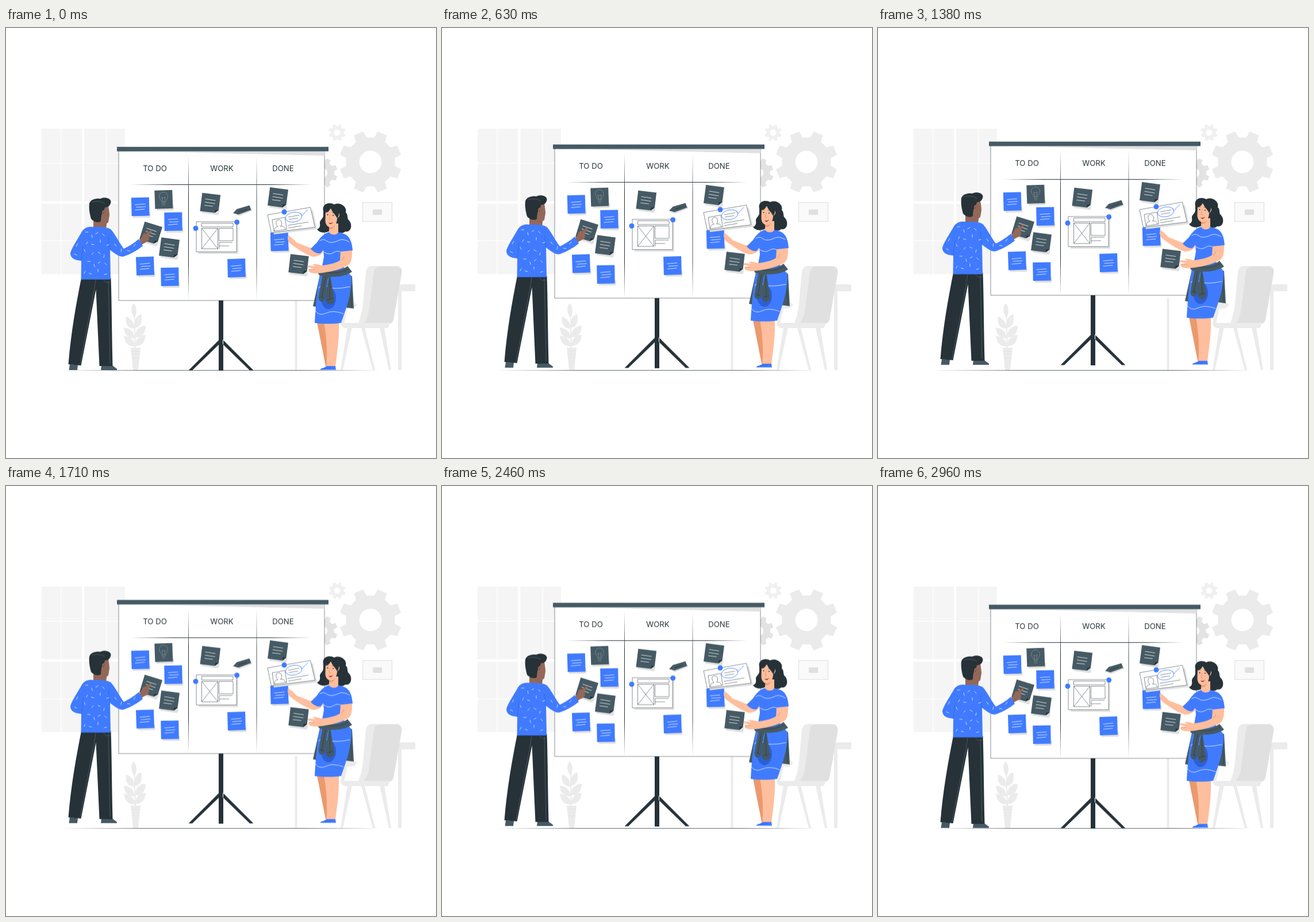
Animation, 748 px wide and 748 px high, one loop 3 s. Source, as an HTML page:

```html
<!DOCTYPE html>
<html lang="en">
<head>
<meta charset="utf-8">
<title>Task board</title>
<style>
  html, body { margin: 0; width: 100%; height: 100%; overflow: hidden; background: #fff; }
  svg { display: block; width: 100vw; height: 100vh; }
  #float { animation: float 3s infinite steps(36); }
  @keyframes float { 50% { transform: translateY(-10px); } }
  text { font: 13.2px Inter, "Open Sans", sans-serif; text-anchor: middle; fill: #263238; }
  .thin { fill: none; stroke: #263238; stroke-width: .55; }
  .sheet { fill: #fff; stroke: #263238; stroke-width: .55; }
  .chalk { fill: none; stroke: #fff; stroke-width: .75; stroke-linecap: round; stroke-linejoin: round; }
  .faint { fill: none; stroke: #6d7d85; stroke-width: .5; }
  .blue { fill: #407bff; }
  .dark { fill: #263238; }
  .slate { fill: #455a64; }
  .skin { fill: #ffbe9d; }
  .shade { fill: #eb996e; }
  .brown { fill: #946858; }
  .g1 { fill: #f5f5f5; }
  .g2 { fill: #ebebeb; }
  .g3 { fill: #e0e0e0; }
</style>
</head>
<body>
<svg viewBox="0 0 748 748">
  <!-- window -->
  <path class="g1" d="M62 175H207V428H62Z"/>
  <path d="M134.200 175V428M62 303.500H207" stroke="#fff" stroke-width="4.500"/>
  <path d="M96 175V428M175.300 175V428M62 235.300H207M62 370.300H207" stroke="#fff" stroke-width="1.200"/>

  <g id="gears"></g>

  <!-- picture frame -->
  <path d="M620.500 303.500H671.500V336.500H620.500Z" fill="#fafafa" stroke="#e6e6e6" stroke-width="1.500"/>
  <path class="g3" d="M638 315.500H654V325H638Z"/>

  <!-- plant -->
  <g class="g2">
    <path d="M217 556H234L230 595H221Z"/>
    <path d="M222 479C228 484 228 496 224 505C217 496 216 485 222 479Z"/>
    <path d="M224 522C221 508 228 500 235 498C238 510 235 520 224 522Z"/>
    <path d="M223 523C210 522 207 512 209 502C218 505 224 513 223 523Z"/>
    <path d="M224 538C225 523 235 517 243 518C243 531 236 539 224 538Z"/>
    <path d="M224 540C211 541 205 531 205 521C216 522 224 530 224 540Z"/>
    <path d="M224 553C226 539 235 533 243 534C242 547 235 554 224 553Z"/>
    <path d="M225 554C212 555 206 546 205 535C216 537 225 544 225 554Z"/>
    <path d="M222.500 495H224L226 557H224Z"/>
  </g>
  <path d="M218 562H233M219 568H232.500M219.500 574H232" stroke="#e0e0e0" stroke-width=".6"/>

  <!-- desk and chair -->
  <path class="g2" d="M502.500 470H506.500V595H502.500ZM680 446H712V458H688V595H682V458H680Z"/>
  <path class="g2" d="M636 414H682Q690 416 688 428L674 507Q672 515 664 515H612Q619 500 621 480L626 424Q628 414 636 414Z"/>
  <path class="g3" d="M648 415H680Q690 416 688 428L674 507Q672 515 664 515H621Q628 508 631 494L640 424Q641 416 648 415Z"/>
  <path class="g2" d="M584 489Q588 476 604 477L611 481Q606 490 594 488L588 514H583Z"/>
  <path class="g2" d="M582 513H668L664 522H590Q583 521 582 513Z"/>
  <path class="g2" d="M594 521H602L586 595H582ZM618 521H624L642 595H638ZM650 521H658L670 595H666Z"/>
  <path class="dark" d="M95 595.500L240 595H520L651 595.500L520 596H240Z" opacity=".7"/>

  <g id="float">
    <!-- tripod -->
    <path class="dark" d="M370 474H378V596H370ZM371 542V550L324 595.500H317.500ZM377 542V550L424 595.500H430.500Z"/>

    <!-- board -->
    <path class="sheet" d="M196 214H554V474H196Z"/>
    <path class="g3" d="M210 214H554V222Z"/>
    <path class="slate" d="M193 206.800H561V214.500H193Z"/>
    <path class="dark" d="M317.500 222L318 290V410L317.500 474L317 410V290ZM436 222L436.400 290V410L436 474L435.600 410V290ZM217 272.500L290 272.100H460L531 272.500L460 272.900H290Z"/>
    <text x="259" y="248.600">TO DO</text>
    <text x="375.500" y="248.600">WORK</text>
    <text x="482" y="248.600">DONE</text>

    <g id="notes"></g>

    <!-- light bulb sketch -->
    <g fill="none" stroke="#93a0a6" stroke-width=".6">
      <path d="M271 303C271 299 266.500 298 266.500 293A7.500 7.500 0 0 1 281.500 293C281.500 298 277.500 299 277.500 303ZM271 305.500H277.500M271.500 308H277"/>
      <path d="M273 303L271 294L274 296L277 294L275.500 303"/>
    </g>

    <!-- tag -->
    <path class="g3" d="M398 325L428 315L428 318L406 327Z"/>
    <path class="slate" d="M395 322L401.500 315L423.500 308.500L426.500 316.500L404.500 324.500Z"/>
    <path d="M405 319.500L419 315" stroke="#263238" stroke-width=".8"/>

    <!-- wireframe sheet -->
    <path class="g3" d="M335 340H404V393H335Z"/>
    <path class="sheet" d="M331 337H401V389.500H331Z"/>
    <path class="thin" d="M340.500 339.500H395V346H340.500ZM340.500 348.500H368.500V384H340.500ZM340.500 348.500L368.500 384M368.500 348.500L340.500 384M370.500 348.500H395V370H370.500ZM394 373H371V384M371 379H388"/>
    <circle class="blue" cx="330" cy="348.500" r="4.500"/>
    <circle class="blue" cx="401.700" cy="337.800" r="4.500"/>

    <!-- profile card -->
    <path class="g3" d="M460 329L534 317L541 350L466 359Z"/>
    <path class="sheet" d="M455 325L529.500 312L537.500 346.500L461.500 356Z"/>
    <path class="thin" d="M463 333.500L485 329.500L488.500 350L466 353.500Z"/>
    <path class="thin" d="M467 353C467 347 470 346 473 345.500C468 340 469 334 474.500 333.500C480 334 481 341 477.500 345C483 344 485 346 486 350"/>
    <path class="thin" d="M491 329L510 325.500M492 333L508 330.500M490 343.500L526 337.500M491 348L514 344"/>
    <ellipse cx="500.500" cy="329" rx="14.500" ry="8.500" transform="rotate(-10 500.500 329)" fill="none" stroke="#407bff" stroke-width=".8"/>
    <path d="M511 322L515 326.500L525 316" fill="none" stroke="#407bff" stroke-width=".8"/>
    <circle class="blue" cx="484" cy="320" r="4.500"/>

    <!-- man -->
    <path class="slate" d="M111 585L125 586L124 595H109.500ZM166 587H185L193 593V595H165Z"/>
    <path class="dark" d="M131 435H182.500C184 480 184 530 185.500 588H162.500L156.500 455L130.500 587L108.500 585C113 530 122 480 131 435Z"/>
    <path class="faint" d="M156 438L153 458L129 584M178 440L181 584M170 437C171 443 176 444 181 442"/>
    <path class="brown" d="M152 330L176 334L174 350H152Z"/>
    <path class="brown" d="M163 308L178 309C179 316 180 322 180 326L178 338C176 341 170 341 166 339Z"/>
    <path class="dark" d="M145 305C148 297 158 296 164 297C171 293 182 296 182.500 302C182 309 177 312 172 312L170 320L166 325L165 336C161 340 152 337 148 332C145 322 144 312 145 305Z"/>
    <ellipse class="brown" cx="170.500" cy="322" rx="3.600" ry="5.500"/>
    <path d="M169 324Q169 319 172 320" fill="none" stroke="#66443a" stroke-width=".7"/>
    <path class="faint" d="M150 303Q160 299 172 305"/>

    <path class="brown" d="M228 373C234 369 236 364 238 359C241 356 245 358 251 351C253 350 254 352 252 356L247 362C250 364 250 369 245 372C241 374 237 376 233 379Z"/>
    <path class="blue" d="M150 346C142 345 134 349 131 356C123 370 112 386 112 393C113 402 122 404 131 405L130.500 437.500H182L181 386C190 393 199 400 206 397C217 393 228 387 238 379L231 367C222 375 213 380 205 384C197 374 190 358 182 350C175 345 160 346 150 346Z"/>
    <path d="M131 405L134 378M181 386L178 364" fill="none" stroke="#2d5fd6" stroke-width=".7"/>
    <path id="knit" class="chalk"/>
    <path d="M242 358L251 352" stroke="#66443a" stroke-width=".6"/>

    <!-- woman -->
    <path class="dark" d="M552 318C549 307 561 301 571 307C581 302 594 311 591 321C596 325 592 331 597 335C603 342 601 356 590 354C584 360 574 355 566 351C558 358 545 357 541 350C545 349 547 345 546 340C545 334 552 332 552 326Z"/>
    <path class="shade" d="M541 512H560L566 588H556Z"/>
    <path class="skin" d="M553 512H579C580 540 576 565 573 589H557.500C559 565 558 540 553 512Z"/>
    <path class="blue" d="M558 588H573L574 594.500H546.500Q547 592 552 591.500Z"/>
    <path d="M549 592.500L566 591" stroke="#2d5fd6" stroke-width=".8"/>
    <path class="slate" d="M547 425L534 484L544 486L556 440ZM588 422L602 432L605 488L589 486Z"/>
    <path d="M599 434L601 486" class="thin"/>

    <path class="skin" d="M550 379C540 383 531 384 523 380L505 373C501 367 494 363 491 360C489 364 490 371 494 375C508 385 520 394 534 398C544 398 552 392 553 386Z"/>
    <path class="blue" d="M562 355C552 358 547 364 541 373L530 384C535 390 542 393 547 392L552 386L553 398L549 420C542 440 539 480 537 513C550 515 570 515 583 513C591 490 602 462 601 432L586 414L583 390L603 387C602 374 599 362 588 358L578 355Z"/>
    <path class="skin" d="M562 340H578V355C576 361 565 361 562 355Z"/>
    <path class="shade" d="M562 344L573 341C571 348 567 351 562 350Z"/>
    <path class="skin" d="M556 317C563 312 574 314 576 321C581 320 582 328 576 331C576 340 571 347 565 347C558 346 555 340 555.500 333Z"/>
    <path class="dark" d="M553 321C560 321 563 318 565 313C567 320 572 323 576 331C581 325 580 315 573 311C564 307 554 311 553 321Z"/>
    <g class="thin" stroke-linecap="round">
      <path d="M557 321L561 320M567 321L571 322"/>
      <path d="M564 325L562 333L565 334" stroke="#d37b53"/>
    </g>
    <circle class="dark" cx="559.500" cy="325" r="1"/>
    <circle class="dark" cx="569" cy="326" r="1"/>
    <path d="M561 338Q565 341 569 337Q567 342 563 341Z" fill="#a63f2b"/>
    <path class="chalk" d="M546 370Q552 366 557 370T568 373T580 369T597 372M552 389Q561 396 569 391T582 390M538 492Q545 502 557 496T587 497M544 452Q551 444 560 450T598 450"/>

    <!-- tied jacket -->
    <ellipse cx="561" cy="470" rx="13" ry="19" fill="#2d5fd6"/>
    <path class="slate" d="M548 419C562 425 583 424 594 414L602 424C588 434 565 434 548 431C541 430 541 419 548 419Z"/>
    <path class="slate" d="M551 427L544 466C542 476 551 480 555 471L559 438L562 432C561 444 554 462 557 476C560 484 572 481 571 472L564 429Z"/>
    <path class="thin" d="M549 422C560 428 580 428 596 419M556 432L549 470M563 435L564 473M547 467L553 470M558 473L569 470"/>

    <path class="skin" d="M582 389L602 387C602 397 602 405 597 411C586 419 566 424 550 426C543 427 533 428 527 424L526 420L537 419L525 416L526 413L538 414L533 411C540 409 546 413 551 413C566 411 576 408 581 404Z"/>
    <path d="M527 420H537M583 404Q587 402 588 397" fill="none" stroke="#d98a62" stroke-width=".7"/>
  </g>
</svg>
<script>
  const $ = id => document.getElementById(id);

  // Ring of flat teeth around a body with a round hole.
  function gear(cx, cy, outer, body, hole, teeth, turn, fill) {
    const step = 2 * Math.PI / teeth;
    const at = (r, a) => `${cx + r * Math.cos(a)} ${cy + r * Math.sin(a)}`;
    let d = '';
    for (let i = 0; i < teeth; i++) {
      const a = (i + turn) * step;
      [[body, -.3], [outer, -.2], [outer, .2], [body, .3]].forEach(([r, k]) => {
        d += (d ? 'L' : 'M') + at(r, a + k * step);
      });
    }
    d += `ZM${cx + hole} ${cy}a${hole} ${hole} 0 1 0 ${-2 * hole} 0a${hole} ${hole} 0 1 0 ${2 * hole} 0Z`;
    return `<path d="${d}" fill="${fill}" fill-rule="evenodd"/>`;
  }
  $('gears').innerHTML =
    gear(634, 233, 54.5, 43, 19.5, 8, .5, '#ebebeb') +
    gear(576, 182, 15, 11.5, 5.5, 8, .5, '#f0f0f0') +
    gear(551, 252, 26, 20, 8, 8, .5, '#e3e3e3');

  // Sticky note about its centre: blue ones are square, dark ones curl at a corner.
  function note([x, y, turn, kind]) {
    const blue = kind === 'blue', plain = kind === 'bulb';
    const shape = blue || plain
      ? 'M-15.500 -16H15.500V16H-15.500Z'
      : 'M-16 -16H16V10L10 16H-16Z';
    const lines = plain ? '' : blue
      ? '<path class="chalk" d="M-9 -3.500L8 -4.500M-7 .8L9 .2M-9 5.500L7 4.500"/>'
      : '<path class="chalk" d="M-9 -6L8 -5.500M-9 -.5L8 0M-9 5L5 5"/><path class="dark" d="M16 10L10 16V10.500Z"/>';
    return `<g transform="translate(${x} ${y}) rotate(${turn})">
      <path class="g3" d="M-12 10H17L17.500 16L16 19.500L-13 19Z"/>
      <path class="${blue ? 'blue' : 'slate'}" d="${shape}"/>${lines}</g>`;
  }
  $('notes').innerHTML = [
    [233.7, 310.8, -1.5, 'blue'], [291, 336.7, -1, 'blue'], [242, 414, -2, 'blue'],
    [285, 432.7, -1, 'blue'], [401, 417.5, -1.5, 'blue'], [475.7, 371.8, -1.5, 'blue'],
    [274.3, 298.3, -2, 'bulb'], [252, 356.8, 17, 'dark'], [284, 382.2, 7.5, 'dark'],
    [355.3, 304.5, 7, 'dark'], [473, 295, 7.5, 'dark'], [509, 411, 6.5, 'dark']
  ].map(note).join('');

  // Short stitches scattered over the sweater.
  let stitches = '';
  for (let row = 0; row < 5; row++) {
    for (let col = 0; col < 4; col++) {
      const a = row * 2.1 + col * 1.3;
      const x = 138 + col * 11 + row % 2 * 4, y = 355 + row * 17 + col * 5 % 9;
      stitches += `M${x} ${y}l${4.5 * Math.cos(a)} ${4.5 * Math.sin(a)}`;
    }
  }
  stitches += 'M122 380l3 -5M119 393l4 2M189 376l3 4M200 389l1 -5M211 387l5 1M222 380l3 -4';
  $('knit').setAttribute('d', stitches);
</script>
</body>
</html>
```
